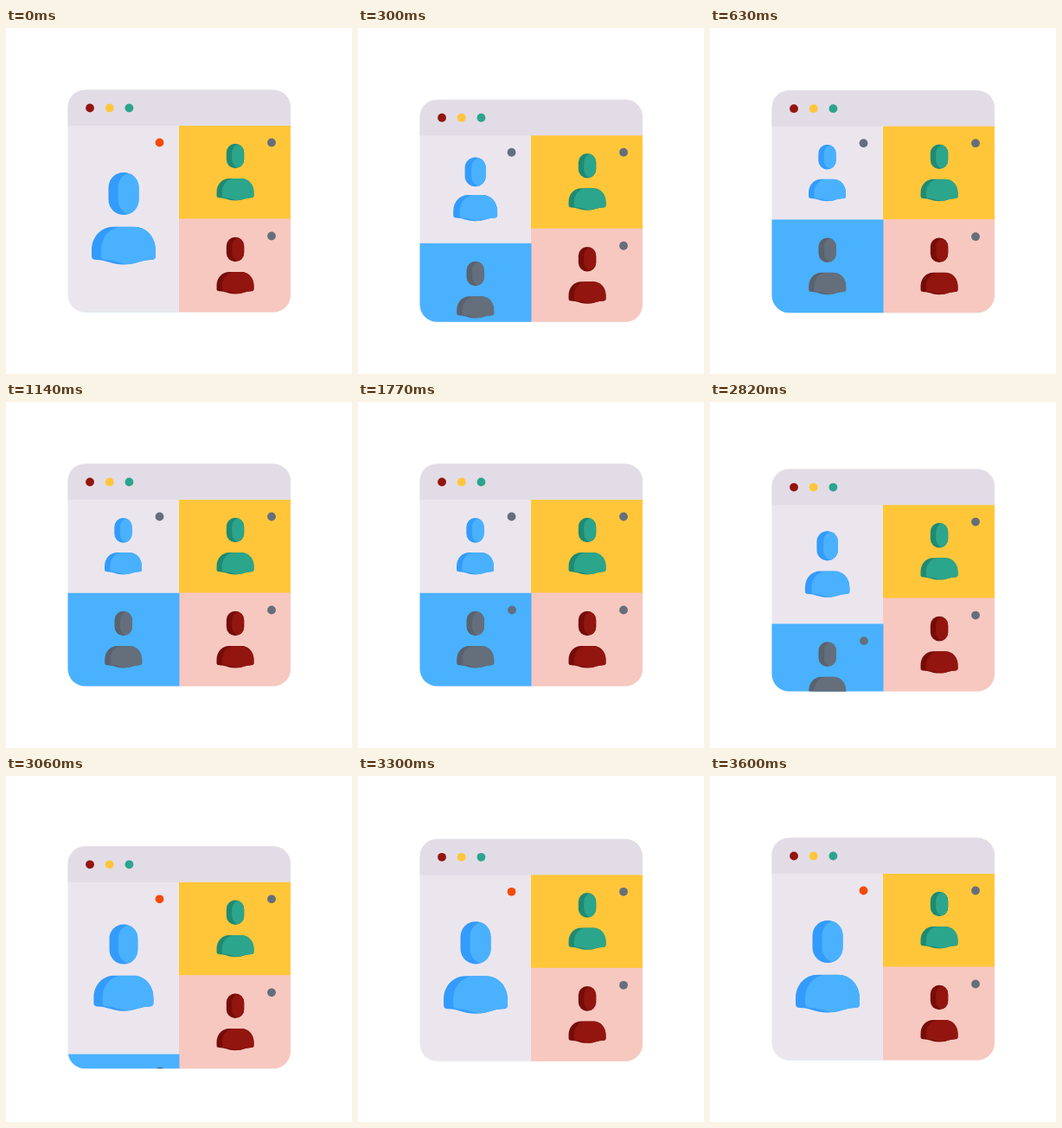
An HTML page with a canvas that plays this animation: 400 px wide and 400 px high, repeating every 5.63 s.

```html
<!DOCTYPE html>
<html>
<head>
<meta charset="utf-8">
<style>
  html, body { margin: 0; width: 100%; height: 100%; overflow: hidden; background: #fff; }
  canvas { display: block; width: 400px; height: 400px; }
</style>
</head>
<body>
<canvas id="stage"></canvas>
<script>
const LOOP = 5630, SPLIT = 2700;
const GREY = '#646f7b', ORANGE = '#f44b0b', YELLOW = '#ffc63a';
const RED = ['#92150f', '#740d08'], GREEN = ['#2ba58c', '#1f8a72'];
const BLUE = ['#4ab1ff', '#349bfb'], SLATE = ['#646f7b', '#59626d'];

const stage = document.getElementById('stage');
const ratio = window.devicePixelRatio || 1;
stage.width = stage.height = 400 * ratio;
const ctx = stage.getContext('2d');

const frame = new Path2D();
frame.roundRect(71.5, 71.5, 257.5, 257, 20);
const head = new Path2D();
head.roundRect(-10.2, -14.3, 20.4, 28.6, 10.2);
const torso = new Path2D(
  'M-21.5 3C-21.5-6-15-12.7-7-12.7H7C15-12.7 21.5-6 21.5 3V7Q21.5 9.5 18.5 9.5' +
  'C12 9.5 8 12.7 0 12.7S-12 9.5-18.5 9.5Q-21.5 9.5-21.5 7Z');

const clamp = x => Math.min(1, Math.max(0, x));
const mix = (a, b, k) => a + (b - a) * k;
const ease = x => 1 - (1 - clamp(x) ** 1.4) ** 3.2;
const swing = x => Math.sin(Math.PI / 2 * clamp(x)) ** 2;

// The window sinks quickly and settles back more slowly.
const dip = t => 12 * (t < 225 ? swing((t - 15) / 210) : 1 - swing((t - 225) / 480));

function rect(color, x, y, w, h) {
  ctx.fillStyle = color;
  ctx.fillRect(x, y, w, h);
}

function dot(color, x, y) {
  ctx.fillStyle = color;
  ctx.beginPath();
  ctx.arc(x, y, 4.9, 0, 7);
  ctx.fill();
}

function shaded(path, [light, dark], x, y, scale) {
  ctx.save();
  ctx.translate(x, y);
  ctx.scale(scale, scale);
  ctx.fillStyle = dark;
  ctx.fill(path);
  ctx.clip(path);
  ctx.translate(6.4, 0);
  ctx.fillStyle = light;
  ctx.fill(path);
  ctx.restore();
}

function person(colors, x, headY, torsoY, scale = 1) {
  shaded(head, colors, x, headY, scale);
  shaded(torso, colors, x, torsoY, scale);
}

function draw(t) {
  const closing = t >= SPLIT;
  const local = closing ? t - SPLIT : t;
  const grow = closing ? ease(local / 650) : 1 - ease(local / 540);
  const size = closing ? grow : 1 - ease(local / 640);
  const slide = 108 * grow;

  ctx.setTransform(ratio, 0, 0, ratio, 0, 0);
  rect('#fff', 0, 0, 400, 400);
  ctx.translate(0, dip(local));
  ctx.save();
  ctx.clip(frame);

  rect('#ebe6ed', 71, 71, 259, 259);
  rect('#e2dce6', 71, 71, 259, 42);
  rect(YELLOW, 200, 113, 130, 108);
  rect('#f7c8c0', 200, 220.5, 130, 109);
  [RED[0], YELLOW, GREEN[0]].forEach((c, i) => dot(c, 97 + 22.7 * i, 92.5));

  person(BLUE, mix(135.5, 136, size), mix(148.4, 191.5, grow),
    mix(186.8, 251.7, grow), mix(1, 1.72, size));
  if (t < SPLIT || t >= 2940) dot(t < 150 || closing ? ORANGE : GREY, 177.5, 132.5);

  person(GREEN, 265, 148, 186.8);
  dot(t >= 1800 && t < 2520 ? ORANGE : GREY, 307, 132.5);
  person(RED, 265, 256, 294.8);
  dot(GREY, 307, 240.5);

  rect(BLUE[0], 71, 220.8 + slide, 129.5, 109);
  person(SLATE, 135.7, 256 + slide, 294.8 + slide);
  if (t >= 1230) dot(GREY, 178, 240.5 + slide);
  ctx.restore();
}

function tick() {
  draw(performance.now() % LOOP);
  requestAnimationFrame(tick);
}
tick();
</script>
</body>
</html>
```
